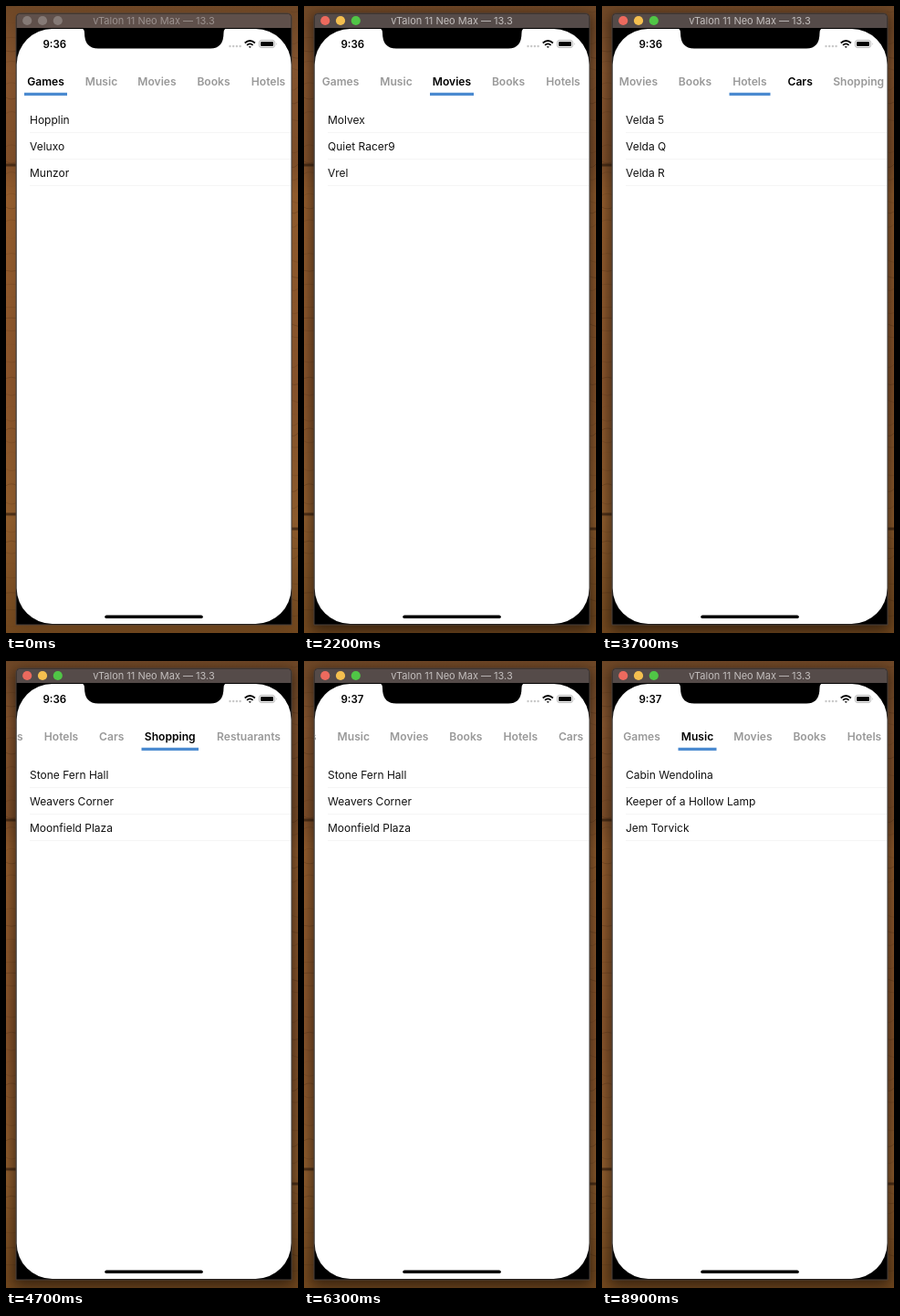
An HTML page that plays this animation: 320x686 px, repeating every 9 s.

```html
<!DOCTYPE html>
<html lang="en">
<head>
<meta charset="utf-8">
<title>Scrolling tabs</title>
<style>
  html, body { margin: 0; width: 100%; height: 100%; overflow: hidden; background: #70452a; }
  svg { display: block; width: 320px; height: 686px; }
  text { font-family: Inter, Roboto, sans-serif; }
  .title { font-size: 11px; text-anchor: middle; }
  .clock { font-size: 11.5px; font-weight: 600; }
  .tab { font-size: 12.1px; font-weight: 600; text-anchor: middle; }
  .row { font-size: 12px; fill: #111; }
</style>
</head>
<body>
<svg viewBox="0 0 320 686">
  <defs>
    <linearGradient id="wood" x1="0" y1="0" x2="0" y2="1">
      <stop offset="0" stop-color="#704827"/>
      <stop offset=".1" stop-color="#8c5931"/>
      <stop offset=".25" stop-color="#84522b"/>
      <stop offset=".3" stop-color="#98602f"/>
      <stop offset=".6" stop-color="#8d572d"/>
      <stop offset=".82" stop-color="#94602f"/>
      <stop offset="1" stop-color="#74491f"/>
    </linearGradient>
    <filter id="blur" x="-20%" y="-10%" width="140%" height="120%">
      <feGaussianBlur stdDeviation="8"/>
    </filter>
    <clipPath id="screen"><rect x="11.700" y="25" width="300.800" height="651" rx="39"/></clipPath>
  </defs>

  <rect width="320" height="686" fill="url(#wood)"/>
  <g id="grain" stroke="#3d2310" fill="none"></g>
  <rect id="shadow" x="8" y="10" width="308" height="674" filter="url(#blur)"/>

  <path d="M11 677V13q0-5 5-5H308q5 0 5 5V677z" fill="#000" stroke="#4b403b"/>
  <path id="bar" d="M11.500 24V13q0-4.500 4.500-4.500H308q4.500 0 4.500 4.500V24z"/>
  <circle class="light" cx="23.200" cy="16" r="5.100"/>
  <circle class="light" cx="40" cy="16" r="5.100"/>
  <circle class="light" cx="56.800" cy="16" r="5.100"/>
  <text id="title" class="title" x="162" y="20">vTalon 11 Neo Max — 13.3</text>

  <rect x="11.700" y="25" width="300.800" height="651" rx="39" fill="#fff"/>
  <path d="M82 24.500q4 0 4 5q0 17 15 17H224q14.500 0 14.500-17q0-5 4-5z"/>

  <text id="clock" class="clock" x="40.500" y="45.500"></text>
  <g fill="#c8c8c8">
    <circle cx="245.500" cy="44" r="1.200"/><circle cx="249.200" cy="44" r="1.200"/>
    <circle cx="252.900" cy="44" r="1.200"/><circle cx="256.600" cy="44" r="1.200"/>
  </g>
  <g fill="none" stroke="#000" stroke-width="1.700">
    <path d="M261.700 40.500q5.600-5 11.200 0M264 42.800q3.300-2.800 6.600 0"/>
    <path d="M265.700 44.200h3.200l-1.600 1.700z" fill="#000" stroke="none"/>
  </g>
  <rect x="277.500" y="37.500" width="17" height="8" rx="2.500" fill="none" stroke="#b4b4b4"/>
  <rect x="279" y="39" width="14" height="5" rx="1.300"/>
  <path d="M296 40q1.400 1.500 0 3z" fill="#b4b4b4"/>

  <g clip-path="url(#screen)">
    <g id="tabs"><rect id="underline" y="94.800" height="3.300" fill="#4b8ad0"/></g>
    <path d="M26 138.500H312M26 167.500H312M26 196.500H312" stroke="#f5f5f5"/>
  </g>
  <text class="row" x="26" y="128.500"></text>
  <text class="row" x="26" y="157.500"></text>
  <text class="row" x="26" y="186.500"></text>
  <rect x="108.300" y="666.400" width="107.500" height="3.700" rx="1.850"/>
</svg>

<script>
const LOOP = 9000, SLIDE = 420, MAX_SCROLL = 227, CENTER = 162;
const ACTIVATE = 400, MINUTE = 5500;
const DRAG = { start: 5500, end: 6700 };

const tabs = [
  { name: 'Games', x: 23.5, w: 40, rows: ['Hopplin', 'Veluxo', 'Munzor'] },
  { name: 'Music', x: 87, w: 35, rows: ['Cabin Wendolina', 'Keeper of a Hollow Lamp', 'Jem Torvick'] },
  { name: 'Movies', x: 145, w: 41, rows: ['Molvex', 'Quiet Racer9', 'Vrel'] },
  { name: 'Books', x: 209.5, w: 36, rows: ['Zelmar Tides', 'Ink and Osprel', 'Quorrin'] },
  { name: 'Hotels', x: 268.5, w: 38, rows: ['Velmora Inn', 'Ostrel Lodge', 'Pinwick Suites'] },
  { name: 'Cars', x: 329.5, w: 26.5, rows: ['Velda 5', 'Velda Q', 'Velda R'] },
  { name: 'Shopping', x: 379, w: 55.5, rows: ['Stone Fern Hall', 'Weavers Corner', 'Moonfield Plaza'] },
  { name: 'Restuarants', x: 458, w: 70, rows: [] }
];

// Each tap selects a tab at once; the underline and the strip follow.
const taps = [
  { at: 0, tab: 0 }, { at: 800, tab: 1 }, { at: 1500, tab: 2 },
  { at: 2350, tab: 3 }, { at: 3000, tab: 4 }, { at: 3690, tab: 5 },
  { at: 4240, tab: 6 }, { at: 7390, tab: 1 }
];

const $ = id => document.getElementById(id);
const rows = document.querySelectorAll('.row');
const lights = document.querySelectorAll('.light');
const lightColors = ['#ec6a5e', '#f4bf4f', '#50c646'];

const clamp = (v, lo, hi) => Math.min(hi, Math.max(lo, v));
const mix = (a, b, p) => a + (b - a) * p;
const ease = p => p < .5 ? 2 * p * p : 1 - 2 * (1 - p) * (1 - p);
const progress = (t, start, length) => ease(clamp((t - start) / length, 0, 1));
const scrollFor = tab => clamp(tab.x + tab.w / 2 - CENTER, 0, MAX_SCROLL);

function add(parent, tag, attributes) {
  const node = document.createElementNS('http://www.w3.org/2000/svg', tag);
  for (const key in attributes) node.setAttribute(key, attributes[key]);
  return parent.appendChild(node);
}

for (let i = 0; i < 46; i++) {
  const y = i * 15 + 5 * Math.sin(i * 7);
  add($('grain'), 'path', {
    d: `M0 ${y}q6 ${4 * Math.sin(i * 3)} 12 0M312 ${y + 6}q4 2 8 ${3 * Math.sin(i * 5)}`,
    opacity: .12 + .1 * Math.sin(i * 11)
  });
}
for (const d of ['M0 174h12', 'M0 556h12', 'M312 572h8'])
  add($('grain'), 'path', { d, 'stroke-width': 3, opacity: .75 });

for (const tab of tabs) {
  tab.label = add($('tabs'), 'text', { class: 'tab', x: tab.x + tab.w / 2, y: 86.5 });
  tab.label.textContent = tab.name;
}

function draw(t) {
  const active = t >= ACTIVATE;
  $('shadow').setAttribute('opacity', active ? .55 : .12);
  $('bar').setAttribute('fill', active ? '#554b49' : '#5f504b');
  $('title').setAttribute('fill', active ? '#c3bebd' : '#9b918e');
  lights.forEach((light, i) => light.setAttribute('fill', active ? lightColors[i] : '#857a76'));
  $('clock').textContent = t < MINUTE ? '9:36' : '9:37';

  const index = taps.findLastIndex(tap => tap.at <= t);
  const current = tabs[taps[index].tab];
  const previous = tabs[taps[Math.max(0, index - 1)].tab];
  const p = progress(t, taps[index].at, SLIDE);
  const dragged = progress(t, DRAG.start, DRAG.end - DRAG.start);
  const scroll = mix(scrollFor(previous), scrollFor(current), p) * (1 - dragged);

  $('tabs').setAttribute('transform', `translate(${-scroll} 0)`);
  $('underline').setAttribute('x', mix(previous.x, current.x, p) - 3.5);
  $('underline').setAttribute('width', mix(previous.w, current.w, p) + 7);
  for (const tab of tabs) tab.label.setAttribute('fill', tab === current ? '#000' : '#999');
  rows.forEach((row, i) => row.textContent = current.rows[i]);
}

function frame() {
  draw(performance.now() % LOOP);
  requestAnimationFrame(frame);
}
frame();
</script>
</body>
</html>
```
